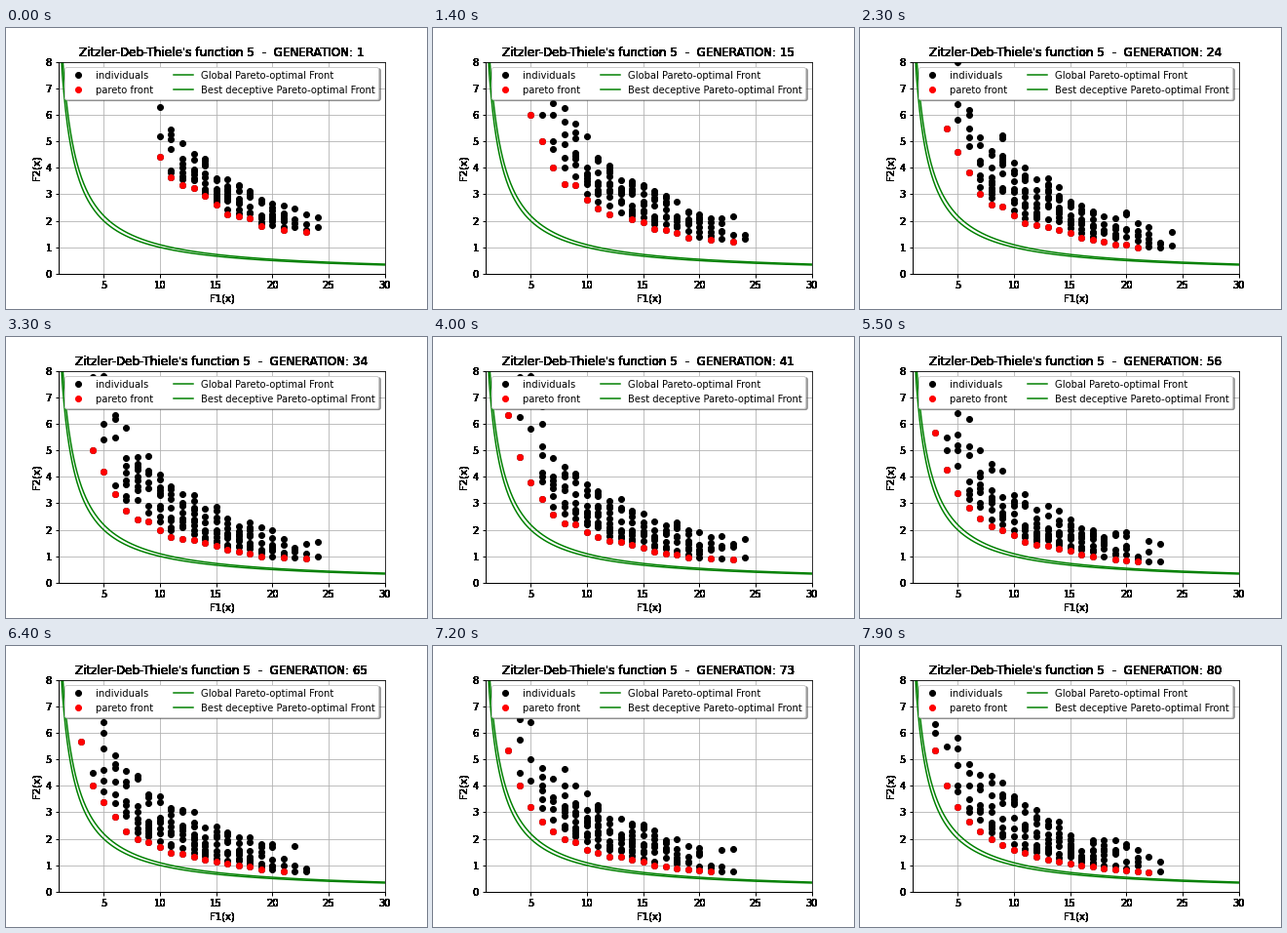
These frames come from a looping animation (432 px wide and 288 px high, 8 s). A matplotlib script:

```python
import matplotlib.pyplot as plt
import numpy as np
from matplotlib.animation import FuncAnimation
from matplotlib.text import Text

GENERATIONS = 80
INTERVAL = 100
TITLE = "Zitzler-Deb-Thiele's function 5  -  GENERATION: {}"
COLUMNS, SLOTS, LIFE = 32, 13, 6

rng = np.random.default_rng(5)
noise = rng.uniform(-1, 1, COLUMNS)
phase = rng.integers(0, LIFE, (COLUMNS, SLOTS))
luck = rng.random((GENERATIONS // LIFE + 2, COLUMNS, SLOTS))


def bounds(gen):
    """First and last occupied F1 value."""
    left = np.ceil(np.interp(gen, [1, 15, 19, 34, 40], [10, 5, 4, 4, 3]))
    return int(left), round(24.4 - gen / 50)


def lowest(x, gen):
    """Best g reached in column x, falling towards 16."""
    left, _ = bounds(gen)
    distance = np.interp(gen, [1, 15, 24, 34, 48, 65, 80],
                         [0.95, 0.53, 0.27, 0.18, 0.09, 0.03, 0])
    edge = np.clip(1 - (x - left) / 5, 0, 1)
    tail = 2 * max(0, x - 22)
    g = 16 + distance * (22 + 3 * noise[x] + 6 * edge) + tail
    return round(g + 0.45 * noise[x])


def population(gen):
    """ZDT5 points (x, g) with integer x = F1 and F2 = g / x."""
    left, right = bounds(gen)
    dots = set()
    for x in range(left, right + 1):
        dots.add((x, lowest(x, gen)))
        u = (x - left + 0.5) / (right - left + 1)
        for k in range(round(12 * np.sin(np.pi * u ** 0.8))):
            # Each slot holds one individual until its next rebirth.
            epoch, age = divmod(gen + phase[x, k], LIFE)
            born = max(1, gen - age)
            dots.add((x, lowest(x, born) + round(2 + 19 * luck[epoch, x, k] ** 1.5)))
    return dots


def pareto(dots):
    best, front = np.inf, []
    for x, y in sorted((x, g / x) for x, g in dots):
        if y < best - 1e-9:
            best = y
            front.append((x, y))
    return front


def harden(text, passes=20):
    """Overprint a label so that its smooth edges turn solid."""
    def draw(renderer):
        for _ in range(passes):
            Text.draw(text, renderer)
    text.draw = draw


plt.rcParams.update({"font.family": "DejaVu Sans", "axes.linewidth": 1,
                     "xtick.major.width": 1, "ytick.major.width": 1})
fig, ax = plt.subplots(figsize=(6, 4), dpi=72)
fig.subplots_adjust(left=0.125, right=0.9, bottom=0.125, top=0.88)
ax.spines[["top", "right"]].set_linewidth(0.8)

black, = ax.plot([], [], "ko", label="individuals")
red, = ax.plot([], [], "ro", label="pareto front")
xs = np.linspace(1, 30, 600)
ax.plot(xs, 10 / xs, "g", label="Global Pareto-optimal Front")
ax.plot(xs, 11 / xs, "g", label="Best deceptive Pareto-optimal Front")

ax.set(xlim=(1, 30), ylim=(0, 8), xlabel="F1(x)", ylabel="F2(x)")
ax.set_xticks(range(5, 31, 5))
ax.set_yticks(range(9))
ax.grid(True)
ax.legend(loc="upper center", ncol=2, fancybox=True, shadow=True)
title = ax.set_title(TITLE.format(1))

for label in (title, ax.xaxis.label, ax.yaxis.label,
              *ax.get_xticklabels(), *ax.get_yticklabels()):
    harden(label)


def update(i):
    dots = population(i + 1)
    black.set_data([x for x, _ in dots], [g / x for x, g in dots])
    red.set_data(*zip(*pareto(dots)))
    title.set_text(TITLE.format(i + 1))
    return black, red, title


anim = FuncAnimation(fig, update, frames=GENERATIONS, interval=INTERVAL, repeat=True)
plt.show()
```
